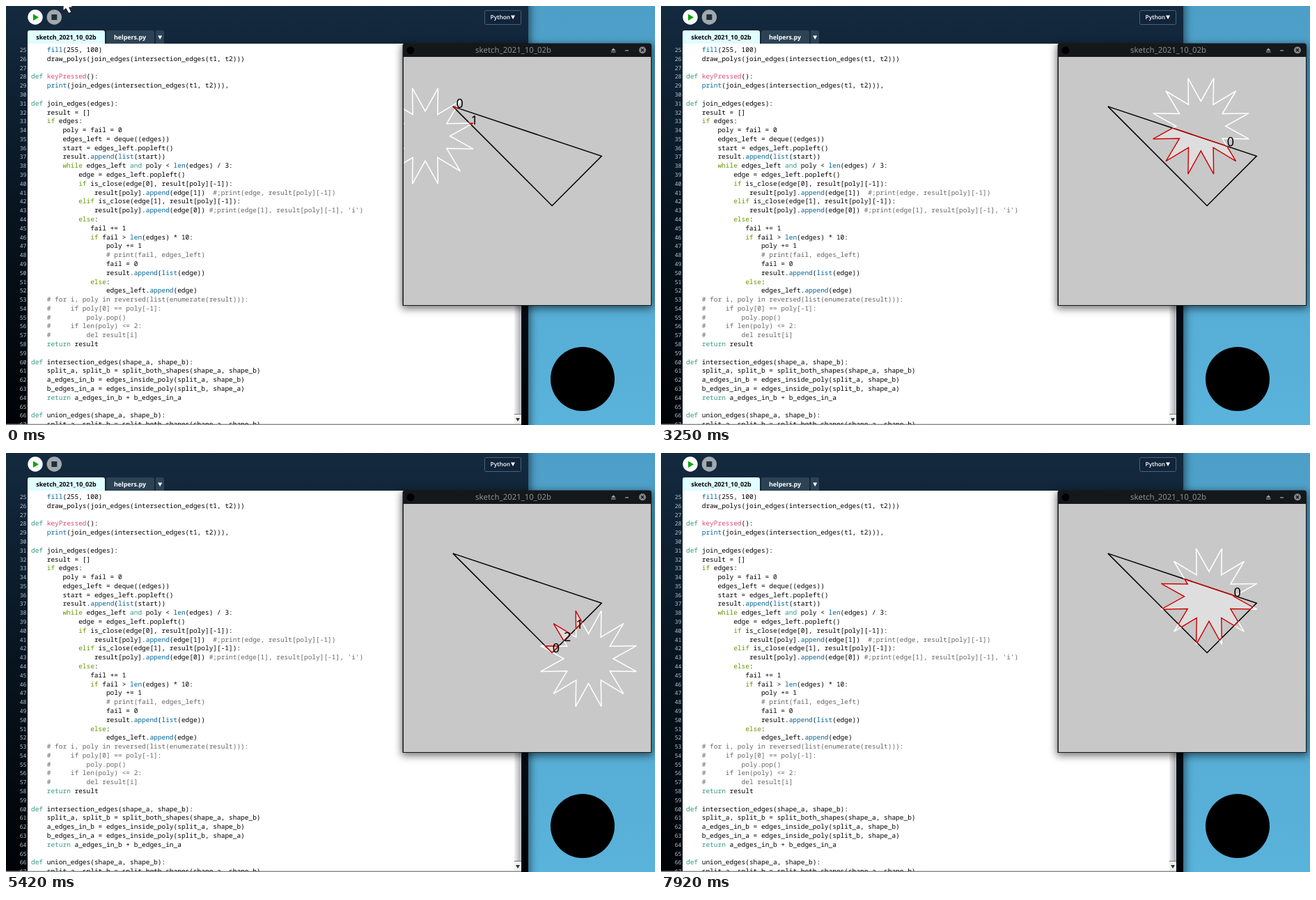
Animation, 932 px wide and 601 px high, one loop 8000 ms. Source, as an HTML page:

```html
<!DOCTYPE html>
<html lang="en">
<head>
<meta charset="utf-8">
<title>Polygon intersection sketch</title>
<style>
  html, body { margin: 0; width: 100%; height: 100%; overflow: hidden; background: #54abd3; }
  svg { display: block; width: 932px; height: 601px; text-rendering: geometricPrecision; }
  text { white-space: pre; }
  .mono { font-family: "Noto Sans Mono", "DejaVu Sans Mono", monospace; }
  .ui { font-family: "Open Sans", "Noto Sans", sans-serif; font-weight: 700; }
  .code { font-size: 9.47px; font-weight: 500; fill: #000; }
  .number { font-size: 8.2px; fill: #b4c2cc; text-anchor: end; }
  .def { fill: #33997e; }
  .flow { fill: #669900; }
  .call { fill: #006699; }
  .event { fill: #d94a7a; }
  .comment { fill: #666; }
  .poly { fill: #fff; fill-opacity: .392; stroke: #c80000; stroke-width: 1.5; }
  .label { font: 18px "Noto Sans", "Open Sans", sans-serif; fill: #000; }
</style>
</head>
<body>
<svg viewBox="0 0 932 601">
  <defs>
    <linearGradient id="sky" x2="0" y2="1">
      <stop stop-color="#4d9fc8"/><stop offset="1" stop-color="#5ab3db"/>
    </linearGradient>
    <linearGradient id="navy" x2="0" y2="1">
      <stop stop-color="#142a3f"/><stop offset=".5" stop-color="#07141f"/><stop offset="1" stop-color="#000206"/>
    </linearGradient>
    <linearGradient id="thumb">
      <stop stop-color="#f2f2f4"/><stop offset="1" stop-color="#a9adb4"/>
    </linearGradient>
    <filter id="blur" x="-20%" y="-20%" width="140%" height="140%"><feGaussianBlur stdDeviation="6"/></filter>
    <clipPath id="page"><rect x="0" y="54" width="730" height="546"/></clipPath>
    <clipPath id="canvas"><rect x="571" y="73" width="355" height="356"/></clipPath>
  </defs>

  <rect width="932" height="601" fill="url(#sky)"/>
  <circle cx="828" cy="535" r="46"/>

  <rect x="-20" y="-20" width="773" height="650" opacity=".5" filter="url(#blur)"/>
  <rect width="750" height="601" fill="url(#navy)"/>
  <rect x="31" y="54" width="699" height="546" fill="#fff"/>
  <rect x="730" y="54" width="10" height="546" fill="#f0f0f0"/>
  <rect x="730" y="54" width="9.5" height="531" fill="url(#thumb)"/>
  <path d="M730 585.5h10" stroke="#777"/>
  <path d="M732 591h6l-3 5z" fill="#333"/>
  <rect y="599.5" width="740" height="1.5" fill="#8b9096"/>

  <circle cx="42" cy="16" r="10.7" fill="#fff"/>
  <path d="M39 11.5v9.5l8-4.75z" fill="#0aa50a"/>
  <circle cx="69.3" cy="16" r="10.7" fill="#a3a8ad"/>
  <rect x="65.3" y="12" width="8" height="8" fill="#1d3040"/>

  <g class="ui" font-size="8.9">
    <path d="M31 54V38q0-3 3-3h105q3 0 3 3v16z" fill="#e0fdff"/>
    <text x="86.5" y="48" text-anchor="middle">sketch_2021_10_02b</text>
    <path d="M144 54V38q0-3 3-3h63q3 0 3 3v16zM215 54V35h9q3 0 3 3v16z" fill="#2c4355"/>
    <text x="178" y="48" text-anchor="middle" fill="#fff">helpers.py</text>
    <path d="M218.2 42.5h6l-3 5.5z" fill="#fff"/>
    <rect x="687.5" y="6.5" width="52" height="20" rx="2" fill="#10243a" stroke="#4d6274"/>
    <text x="695.5" y="19" font-size="8.4" style="font-weight:600" fill="#fff">Python</text>
    <path d="M725 13.5h6l-3 5.5z" fill="#fff"/>
  </g>

  <g id="listing" class="mono" clip-path="url(#page)"></g>

  <rect x="568" y="56" width="361" height="378" opacity=".55" filter="url(#blur)"/>
  <path d="M569.5 430V57q0-3.5 3.5-3.5h350.500q3.500 0 3.500 3.500v373z" fill="#15181b"/>
  <circle cx="581" cy="63.500" r="5.500"/>
  <text x="728.500" y="67.300" text-anchor="middle" font-size="11.400" font-family="Noto Sans, sans-serif" fill="#8c8f91">sketch_2021_10_02b</text>
  <path d="M869 64h6.500l-3.250-3.800zM869 65.300h6.500v1.200h-6.500zM889 63.200h5v1.200h-5z" fill="#a0a3a5"/>
  <circle cx="914" cy="63.200" r="5" fill="#85888a"/>
  <path d="M912 61.200l4 4m0-4l-4 4" stroke="#15181b" stroke-width="1.300"/>
  <rect x="571" y="73" width="355" height="356" fill="#c8c8c8"/>
  <g clip-path="url(#canvas)">
    <path id="triangle" fill="none" stroke="#000" stroke-width="1.5"/>
    <path id="star" fill="none" stroke="#fff" stroke-width="1.5"/>
    <g id="overlap"></g>
  </g>

  <path id="arrow" d="M0 0V17L4 13.500 8 20.500 11.800 18.800 8.800 12H14.500z" fill="#fff" stroke="#111" stroke-width="1"/>
  <g id="beam" fill="none">
    <path d="M-4-9.500h3l1 1 1-1h3M0-8.500v17M-4 9.500h3l1-1 1 1h3" stroke="#fff" stroke-width="2.600"/>
    <path d="M-4-9.500h3l1 1 1-1h3M0-8.500v17M-4 9.500h3l1-1 1 1h3" stroke="#000" stroke-width="1.200"/>
  </g>
</svg>

<script>
const FIRST_LINE = 25;
const SOURCE = `    fill(255, 100)
    draw_polys(join_edges(intersection_edges(t1, t2)))

def keyPressed():
    print(join_edges(intersection_edges(t1, t2))),

def join_edges(edges):
    result = []
    if edges:
        poly = fail = 0
        edges_left = deque((edges))
        start = edges_left.popleft()
        result.append(list(start))
        while edges_left and poly < len(edges) / 3:
            edge = edges_left.popleft()
            if is_close(edge[0], result[poly][-1]):
                result[poly].append(edge[1])  #;print(edge, result[poly][-1])
            elif is_close(edge[1], result[poly][-1]):
                result[poly].append(edge[0]) #;print(edge[1], result[poly][-1], 'i')
            else:
               fail += 1
               if fail > len(edges) * 10:
                   poly += 1
                   # print(fail, edges_left)
                   fail = 0
                   result.append(list(edge))
               else:
                   edges_left.append(edge)
    # for i, poly in reversed(list(enumerate(result))):
    #     if poly[0] == poly[-1]:
    #         poly.pop()
    #     if len(poly) <= 2:
    #         del result[i]
    return result

def intersection_edges(shape_a, shape_b):
    split_a, split_b = split_both_shapes(shape_a, shape_b)
    a_edges_in_b = edges_inside_poly(split_b, shape_a)
    b_edges_in_a = edges_inside_poly(split_a, shape_b)
    return a_edges_in_b + b_edges_in_a

def union_edges(shape_a, shape_b):
    split_a, split_b = split_both_shapes(shape_a, shape_b)`
  .replace('edges_inside_poly(split_b, shape_a)', 'edges_inside_poly(split_a, shape_b)')
  .replace(/(b_edges_in_a = edges_inside_poly)\(split_a, shape_b\)/, '$1(split_b, shape_a)');

const $ = id => document.getElementById(id);

function highlight(line) {
  const tokens = /(#.*)|\b(def|return|and)\b|\b(if|elif|else|while)\b|\b(fill|print|append|list|len)\b|\b(keyPressed)\b|</g;
  const names = ['comment', 'def', 'flow', 'call', 'event'];
  return line.replace(tokens, (word, ...groups) => {
    const kind = groups.slice(0, 5).findIndex(Boolean);
    const safe = word.replace(/</g, '&lt;');
    return kind < 0 ? safe : `<tspan class="${names[kind]}">${safe}</tspan>`;
  });
}

$('listing').innerHTML = SOURCE.split('\n').map((line, i) => {
  const y = (66 + i * 12.79).toFixed(2);
  const indent = line.search(/\S|$/);
  return `<text class="number" x="29.5" y="${y}">${FIRST_LINE + i}</text>` +
    `<text class="code" x="${36 + indent * 5.68}" y="${y}">${highlight(line.slice(indent))}</text>`;
}).join('');

// Sketch geometry, 500 units wide.
const UNIT = 0.7115, RADIUS = 100 * UNIT;
const triangle = [[100, 100], [400, 200], [300, 300]].map(([x, y]) => [570.7 + x * UNIT, 73 + y * UNIT]);

const makeStar = (cx, cy) => Array.from({ length: 24 }, (_, i) => {
  const angle = i * Math.PI / 12, r = i % 2 ? RADIUS : RADIUS / 2;
  return [cx + Math.cos(angle) * r, cy + Math.sin(angle) * r];
});
const toPath = points => 'M' + points.map(p => p.map(v => v.toFixed(2))).join('L') + 'Z';
const toEdges = points => points.map((p, i) => [p, points[(i + 1) % points.length]]);
const mix = (a, b, t) => [a[0] + (b[0] - a[0]) * t, a[1] + (b[1] - a[1]) * t];
const isClose = (a, b) => Math.hypot(a[0] - b[0], a[1] - b[1]) < 1e-4;

function crossing([a, b], [c, d]) {
  const rx = b[0] - a[0], ry = b[1] - a[1], sx = d[0] - c[0], sy = d[1] - c[1];
  const det = rx * sy - ry * sx, dx = c[0] - a[0], dy = c[1] - a[1];
  const t = (dx * sy - dy * sx) / det, u = (dx * ry - dy * rx) / det;
  return t > 0 && t < 1 && u >= 0 && u <= 1 ? [t] : [];
}

const isInside = ([x, y], shape) => toEdges(shape).filter(([a, b]) =>
  (a[1] > y) !== (b[1] > y) && x < a[0] + (y - a[1]) / (b[1] - a[1]) * (b[0] - a[0])).length % 2 === 1;

function edgesInside(shape, other) {
  const cutters = toEdges(other);
  return toEdges(shape).flatMap(edge => {
    const cuts = [0, ...cutters.flatMap(c => crossing(edge, c)).sort((a, b) => a - b), 1];
    return cuts.slice(1).map((t, i) => [mix(...edge, cuts[i]), mix(...edge, t)]);
  }).filter(([a, b]) => !isClose(a, b) && isInside(mix(a, b, 0.5), other));
}

// Chains loose edges into polygons; the order decides the labels.
function joinEdges(edges) {
  if (!edges.length) return [];
  const queue = [...edges], result = [[...queue.shift()]];
  let poly = 0, fail = 0;
  while (queue.length && poly < Math.floor(edges.length / 3)) {
    const edge = queue.shift(), end = result[poly][result[poly].length - 1];
    if (isClose(edge[0], end)) result[poly].push(edge[1]);
    else if (isClose(edge[1], end)) result[poly].push(edge[0]);
    else if (++fail > edges.length * 10) {
      poly++;
      fail = 0;
      result.push([...edge]);
    } else queue.push(edge);
  }
  return result;
}

// Star centre: [tick, x, y], 12 ticks per second.
const TICKS = 12, LOOP = 8000;
const PATH = [
  [13, 602, 186.5], [14, 580, 160], [18, 655, 208], [21, 651, 204], [25, 687, 209.5], [29, 698, 210.3],
  [38, 698, 210.3], [39, 775.3, 172.3], [48, 818, 170.5], [50, 823.5, 179.5], [58, 826, 231],
  [65, 836.5, 295], [66, 836.5, 295], [67, 841, 299], [68, 841, 299], [71, 851, 296], [74, 851, 296],
  [78, 789, 289.3], [79, 789, 289.3], [80, 767, 291.5], [83, 767, 291.5], [84, 767, 276.7],
  [86, 778, 256], [87, 772, 247], [88, 772, 247], [95, 787, 205.8]
];
const POINTER = { 7: [240, 45], 8: [390.5, 92], 12: [455, 98], 13: [525, 112] };

function centreAt(tick) {
  const next = PATH.findIndex(k => k[0] >= tick);
  if (next <= 0) return PATH[next < 0 ? PATH.length - 1 : 0].slice(1);
  const a = PATH[next - 1], b = PATH[next];
  return mix(a.slice(1), b.slice(1), (tick - a[0]) / (b[0] - a[0]));
}

function place(id, visible, [x, y]) {
  $(id).setAttribute('visibility', visible ? 'visible' : 'hidden');
  $(id).setAttribute('transform', `translate(${x} ${y})`);
}

function draw(tick) {
  const star = makeStar(...centreAt(tick));
  const polys = joinEdges([...edgesInside(star, triangle), ...edgesInside(triangle, star)]);
  $('star').setAttribute('d', toPath(star));
  $('overlap').innerHTML =
    polys.map(p => `<path class="poly" d="${toPath(p)}"/>`).join('') +
    polys.map((p, i) => `<text class="label" x="${p[0][0]}" y="${p[0][1]}">${i}</text>`).join('');

  const spot = tick < 7 ? [82, -10] : POINTER[tick] || POINTER[8];
  place('arrow', tick < 8, spot);
  place('beam', tick >= 8 && tick < 14, spot);
}

$('triangle').setAttribute('d', toPath(triangle));
const start = performance.now();
let shown = -1;
function update() {
  const time = (performance.now() - start) % LOOP;
  const tick = Math.min(95, Math.floor((time + 5) * TICKS / 1000));
  if (tick !== shown) draw(shown = tick);
  requestAnimationFrame(update);
}
update();
</script>
</body>
</html>
```
